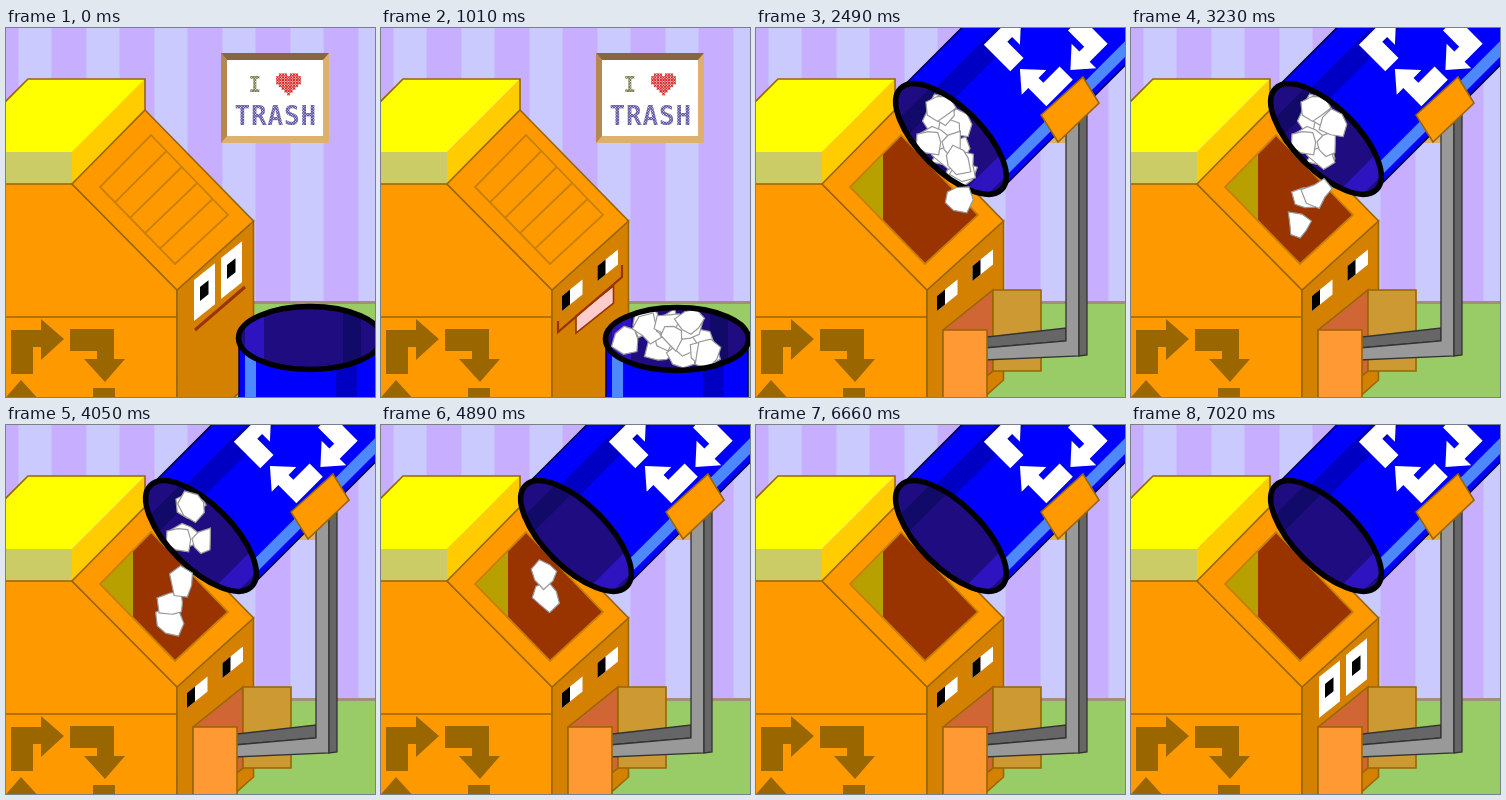
Animation of 369x369 px, one loop 8 s. Source, as an HTML page with a canvas:

```html
<!DOCTYPE html>
<html lang="en">
<head>
<meta charset="utf-8">
<style>
html, body { margin: 0; width: 100%; height: 100%; overflow: hidden; }
canvas { display: block; width: 100vw; height: 100vh; }
</style>
</head>
<body>
<canvas id="stage" width="369" height="369" aria-label="I love TRASH"></canvas>
<script>
const c = document.getElementById('stage').getContext('2d');
const LOOP = 8000, LINE = '#996600', TAU = Math.PI * 2;
const mix = (a, b, k) => a + (b - a) * k;
const hash = n => { const v = Math.sin(n * 127.1) * 43758.5; return v - Math.floor(v); };

function rect(x, y, w, h, fill) {
  c.fillStyle = fill;
  c.fillRect(x, y, w, h);
}
function trace(pts) {
  c.beginPath();
  for (let i = 0; i < pts.length; i += 2) c.lineTo(pts[i], pts[i + 1]);
}
function outline(stroke, width) {
  c.strokeStyle = stroke;
  c.lineWidth = width;
  c.stroke();
}
function poly(pts, fill, stroke, width = 1.6) {
  trace(pts);
  c.closePath();
  if (fill) { c.fillStyle = fill; c.fill(); }
  if (stroke) outline(stroke, width);
}
function line(pts, stroke = LINE, width = 1.6) {
  trace(pts);
  outline(stroke, width);
}
// Parallelogram lying on the carton's receding side
function slant(x, y, w, h, fill, stroke) {
  poly([x, y, x + w, y - w * .8, x + w, y - w * .8 + h, x, y + h], fill, stroke);
}

function embroidery() {
  const cell = 2.75;
  const word = (text, x, y, size, color) => {
    c.font = `bold ${size}px "DejaVu Sans Mono", monospace`;
    c.letterSpacing = size / 30 + 'px';
    c.fillStyle = color;
    c.fillText(text, x, y);
  };
  word('I', 242.5, 64, 21, '#77774a');
  word('TRASH', 228.5, 97, 26, '#5a52a0');

  for (let i = -4; i <= 4; i++) for (let j = -4; j <= 4; j++) {
    const u = i / 3.7, v = .2 - j / 3.6;
    if ((u * u + v * v - 1) ** 3 < u * u * v ** 3)
      rect(282.5 + (i - .5) * cell, 55 + (j - .5) * cell, cell, cell, '#d82222');
  }
  // Gaps between the cross stitches
  for (let x = 223; x < 315; x += cell) for (let y = 42; y < 102; y += cell) {
    rect(x + cell / 2, y, .9, .9, '#fff');
    rect(x, y + cell / 2, .9, .9, '#fff');
  }
}

function room() {
  rect(0, 0, 369, 274, '#c8aeff');
  for (let x = 12.5; x < 369; x += 68) rect(x, 0, 33, 274, '#cacaff');
  rect(0, 273, 369, 3, '#a09078');
  rect(0, 276, 369, 93, '#99cc66');

  rect(215, 25, 108, 90, '#ddb070');
  poly([215, 25, 323, 25, 317, 32, 221, 32], '#886644');
  poly([215, 25, 221, 32, 221, 108, 215, 115], '#b48850');
  rect(221, 32, 96, 76, '#fff');
  embroidery();
}

// Four bent arrows chasing each other around a centre
function recycle(x, y, scale, fill) {
  c.save();
  c.translate(x, y);
  c.scale(scale, scale);
  for (let i = 0; i < 4; i++) {
    poly([-52, -51, -22, -51, -22, -62, 1, -42, -22, -21, -22, -34, -30, -34, -30, -7, -52, -7], fill);
    c.rotate(TAU / 4);
  }
  c.restore();
}

function hatch(open) {
  const slat = k => [mix(94, 169, k), mix(159, 236, k), mix(145, 222, k), mix(107, 187, k)];
  const panel = k => [145, 107, ...slat(k).slice(2), ...slat(k).slice(0, 2), 94, 159];
  if (open) {
    poly(panel(1), '#993300');
    poly([94, 159, 127, 126, 127, 192], '#b8a000');
    poly(panel(1 - open), '#ff9900');
  }
  poly(panel(1), null, '#c88000', 1.8);
  for (let i = 1; i < 5 * (1 - open); i++) line(slat(i / 5), '#c88000', 1.8);
}

function carton(open) {
  poly([-5, 78, 22, 51, 139, 51, 66, 124, -5, 124], '#ffff00');
  poly([139, 51, 139, 82, 66, 156, 66, 124], '#ffcc00');
  rect(0, 124, 66, 32, '#cccc66');
  line([-5, 78, 22, 51, 139, 51, 139, 82]);
  poly([-5, 156, 66, 156, 171, 262, 171, 380, -5, 380], '#ff9900', LINE);
  poly([171, 262, 247.5, 193, 247.5, 352, 216, 380, 171, 380], '#d48000', LINE);
  poly([139, 82, 247.5, 193, 171, 262, 66, 156], '#ff9900', LINE);
  line([0, 289, 171, 289]);
  recycle(57, 353, 1, LINE);
  hatch(open);
}

function face(t) {
  const awake = t < 450 || t >= 7020;
  for (const side of [0, 1]) {
    if (awake) {
      const x = 188 + side * 27, y = 252 - side * 22;
      slant(x, y, 21, 41, '#fff');
      slant(x + 6, y + 7, 8.5, 14, '#000');
    } else {
      const x = 181 + side * 35.5, y = 268 - side * 30;
      slant(x, y, 20.5, 15, '#fff');
      slant(x, y, 8, 15, '#000');
    }
  }
  if (t < 450) line([189, 302, 239, 259], '#993300', 3);
  else if (t < 1470) {
    if (t >= 1010) slant(195, 288, 37.5, 17, '#ffcccc', '#993300');
    line([177, 293, 177, 304, 241, 249, 241, 237], '#993300', 2.2);
  }
}

// The two doors part at the middle of the mouth
function door(hinge, hingeY, edge, edgeY, open, fill) {
  const x = mix(212, edge, open), y = mix(282, edgeY, open);
  poly([hinge, hingeY, x, y, x, y + 81, hinge, hingeY + 81], fill, LINE);
}
function rightDoor(open) {
  poly([187, 302, 237, 262, 237, 343, 187, 383], '#cf6633', LINE);
  door(237, 262, 285, 262, open, '#cc9933');
}
const leftDoor = open => door(187, 302, 231, 302, open, '#ff9933');

// Crumpled papers spread over the can's mouth; each drops at its own step
const FLIGHT = 6;
const PAPERS = Array.from({ length: 16 }, (_, i) => ({
  x: -50 + 50 * (i * .618 % 1 + i / 15),
  y: 17 * Math.sin(i * 2.4),
  drop: Math.floor(i * 1.75)
}));

function paper(i, x, y, turn) {
  const pts = [];
  for (let k = 0; k < 7; k++) {
    const a = k / 7 * TAU + i + turn, r = 8 + 10 * hash(i * 7 + k + 1);
    pts.push(x + r * Math.cos(a), y + r * Math.sin(a));
  }
  poly(pts, '#fff', '#999', 1.2);
}
function falling(step) {
  PAPERS.forEach(({ x, y, drop }, i) => {
    const u = (step - drop) / FLIGHT;
    if (u < 0 || u >= 1) return;
    const startX = 195 + (y - x) * Math.SQRT1_2, startY = 111 - (x + y) * Math.SQRT1_2;
    paper(i, mix(startX, 165, u) - 8 * Math.sin(Math.PI * u), mix(startY, 218, u), TIPPED + u * 2);
  });
}

const TIPPED = -Math.PI * .75;
function can(x, y, angle, full, step) {
  const mouth = () => { c.beginPath(); c.ellipse(0, 0, 71.5, 31.5, 0, 0, TAU); };
  c.save();
  c.translate(x, y);
  c.rotate(angle);
  rect(-71, 0, 142, 400, '#0000ff');
  rect(-65, 0, 11, 400, '#4d88ff');
  rect(26, 0, 21, 400, '#0000c4');
  for (const edge of [-71, 71]) line([edge, 0, edge, 400], '#000044', 1.5);
  recycle(0, 134, .85, '#fff');

  c.save();
  mouth();
  c.clip();
  rect(-75, -40, 150, 80, '#1f0c80');
  rect(-65, -40, 19, 80, '#2e14c0');
  rect(33, -40, 18, 80, '#120a68');
  if (full) PAPERS.forEach((p, i) => { if (step < p.drop) paper(i, p.x, p.y, 0); });
  c.restore();
  mouth();
  outline('#000', 5.5);
  c.restore();
}

function arm() {
  poly([205, 312, 310, 300, 310, 313, 205, 322], '#666', '#333', 1.3);
  poly([205, 322, 310, 313, 310, 85, 323, 85, 323, 328, 205, 333], '#999', '#333', 1.3);
  poly([323, 85, 331, 80, 331, 327, 323, 328], '#666', '#333', 1.3);
}

const SHAKES = [5540, 5820, 6020, 6200, 6380, 6660, 6840, 7020];

function draw(t) {
  const open = t < 1470 ? 0 : Math.min(1, (Math.floor((t - 1470) / 92) + 1) / 6);
  room();
  carton(open);
  if (open) rightDoor(open);
  face(t);

  if (t < 2110) {
    const full = t >= 450;
    if (open) leftDoor(open);
    can(full ? 296 : 304, full ? 311 : 310, 0, full, -1);
    return;
  }
  const step = t < 2310 ? -1 : Math.floor((t - 2290) / 92.5);
  const pulled = SHAKES.filter(s => t >= s).length % 2;
  if (t >= SHAKES[0]) rect(296, 95, 27, 19, '#deb048');
  c.save();
  if (pulled) c.translate(-15, 14);
  arm();
  can(195, 111, TIPPED, true, step);
  poly([285, 87, 327, 49, 343, 75, 302, 114], '#ff9900', LINE);
  c.restore();
  leftDoor(1);
  falling(step);
}

function tick() {
  draw(performance.now() % LOOP);
  requestAnimationFrame(tick);
}
tick();
</script>
</body>
</html>
```
